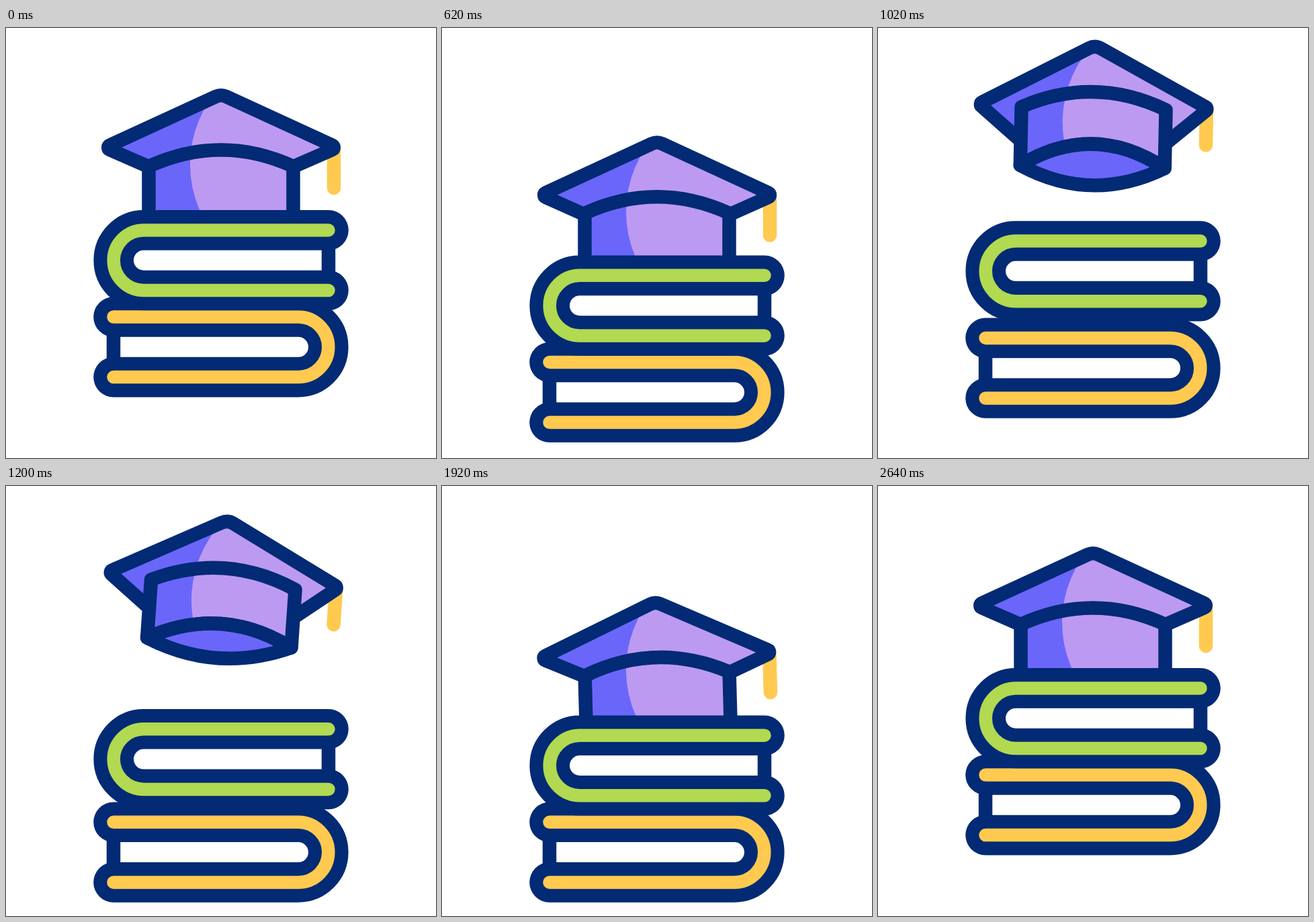
These frames come from a looping animation (640x640 px, 2.8 s). An HTML page with a canvas:

```html
<!DOCTYPE html>
<html>
<head>
<meta charset="utf-8">
<style>
html, body { margin: 0; width: 100%; height: 100%; overflow: hidden; background: #fff; }
canvas { display: block; }
</style>
</head>
<body>
<canvas id="stage" width="640" height="640"></canvas>
<script>
const ctx = document.getElementById('stage').getContext('2d');
const LOOP = 2800;
const NAVY = '#032a74', INDIGO = '#6b66fa', LILAC = '#bc9af2', YELLOW = '#ffca4f', GREEN = '#b1d951';

// Each track is a list of [time, value] keys, eased in and out between keys.
const TRACKS = {
  lower: [[0, 0], [600, 70.3], [800, -22], [1200, 70.3], [1980, 70.3], [2640, 0]],
  upper: [[0, 0], [600, 70.3], [800, -22], [1300, 70.3], [1980, 70.3], [2640, 0]],
  sink: [[0, 0], [600, 75], [1980, 75], [2640, 0]],
  flight: [[600, 0], [800, 1], [880, 1], [1980, 0]],
  tilt: [[880, 0], [1300, 4.6], [1820, -5], [1980, 0]],
  drift: [[880, 0], [1300, 3], [1980, 0]]
};

const mix = (a, b, t) => a + (b - a) * t;

function valueAt(keys, time) {
  if (time <= keys[0][0]) return keys[0][1];
  for (let i = 1; i < keys.length; i++) {
    const [t0, a] = keys[i - 1], [t1, b] = keys[i];
    if (time < t1) {
      const u = (time - t0) / (t1 - t0);
      return mix(a, b, u * u * (3 - 2 * u));
    }
  }
  return keys[keys.length - 1][1];
}

function stroke(path, color, width) {
  ctx.strokeStyle = color;
  ctx.lineWidth = width;
  ctx.stroke(path);
}

// side = 1 puts the spine on the left, -1 on the right.
function drawBook(y, side, color) {
  const r = 44.8;
  ctx.save();
  ctx.translate(320, y);
  ctx.scale(side, 1);
  stroke(new Path2D(`M160 0V${2 * r}`), NAVY, 20.5);
  const cover = new Path2D(`M160 0H-115a${r} ${r} 0 0 0 0 ${2 * r}H160`);
  stroke(cover, NAVY, 59.6);
  stroke(cover, color, 19.5);
  ctx.restore();
}

function drawTwoTone(path, shadeY) {
  ctx.fillStyle = INDIGO;
  ctx.fill(path);
  ctx.save();
  ctx.clip(path);
  ctx.fillStyle = LILAC;
  ctx.beginPath();
  ctx.arc(124, shadeY, 170, 0, 7);
  ctx.fill();
  ctx.restore();
  stroke(path, NAVY, 20.5);
}

// Coordinates are relative to the top of the board; view goes from level (0) to seen from below (1).
function drawCap(x, y, tilt, view) {
  const at = (level, below) => mix(level, below, view);
  const tipX = at(173, 171), tipY = at(77, 89), half = 107.5;
  const edge = at(105.5, 144), top = at(105, 91), base = at(190, 178);
  const shadeY = at(102, 110);

  ctx.save();
  ctx.translate(x, y + 104);
  ctx.rotate(tilt * Math.PI / 180);
  ctx.translate(0, -104);

  stroke(new Path2D(`M168 ${tipY}V${at(137, 143)}`), YELLOW, 20.5);

  const board = new Path2D();
  board.moveTo(-half, edge);
  board.arcTo(-tipX, tipY, 0, -2.5, 3.6);
  board.arcTo(0, -2.5, tipX, tipY, 19);
  board.arcTo(tipX, tipY, half, edge, 3.6);
  board.lineTo(half, edge);
  board.closePath();
  drawTwoTone(board, shadeY);

  const innerRim = `${half} ${base}Q0 ${at(190, 107)} ${-half} ${base}`;
  drawTwoTone(new Path2D(`M${-half} ${top}Q0 ${at(56, 42)} ${half} ${top}L${innerRim}Z`), shadeY);

  const opening = new Path2D(`M${innerRim}Q0 ${at(190, 236)} ${half} ${base}Z`);
  ctx.fillStyle = INDIGO;
  ctx.fill(opening);
  stroke(opening, NAVY, 20.5);
  ctx.restore();
}

function draw(now) {
  const time = now % LOOP, pose = {};
  for (const name in TRACKS) pose[name] = valueAt(TRACKS[name], time);
  ctx.fillStyle = '#fff';
  ctx.fillRect(0, 0, 640, 640);
  ctx.lineCap = ctx.lineJoin = 'round';
  drawCap(320 + pose.drift, 101 + pose.sink - 155 * pose.flight, pose.tilt, pose.flight);
  drawBook(430 + pose.lower, -1, YELLOW);
  drawBook(300.9 + pose.upper, 1, GREEN);
  requestAnimationFrame(() => draw(performance.now()));
}

draw(0);
</script>
</body>
</html>
```
